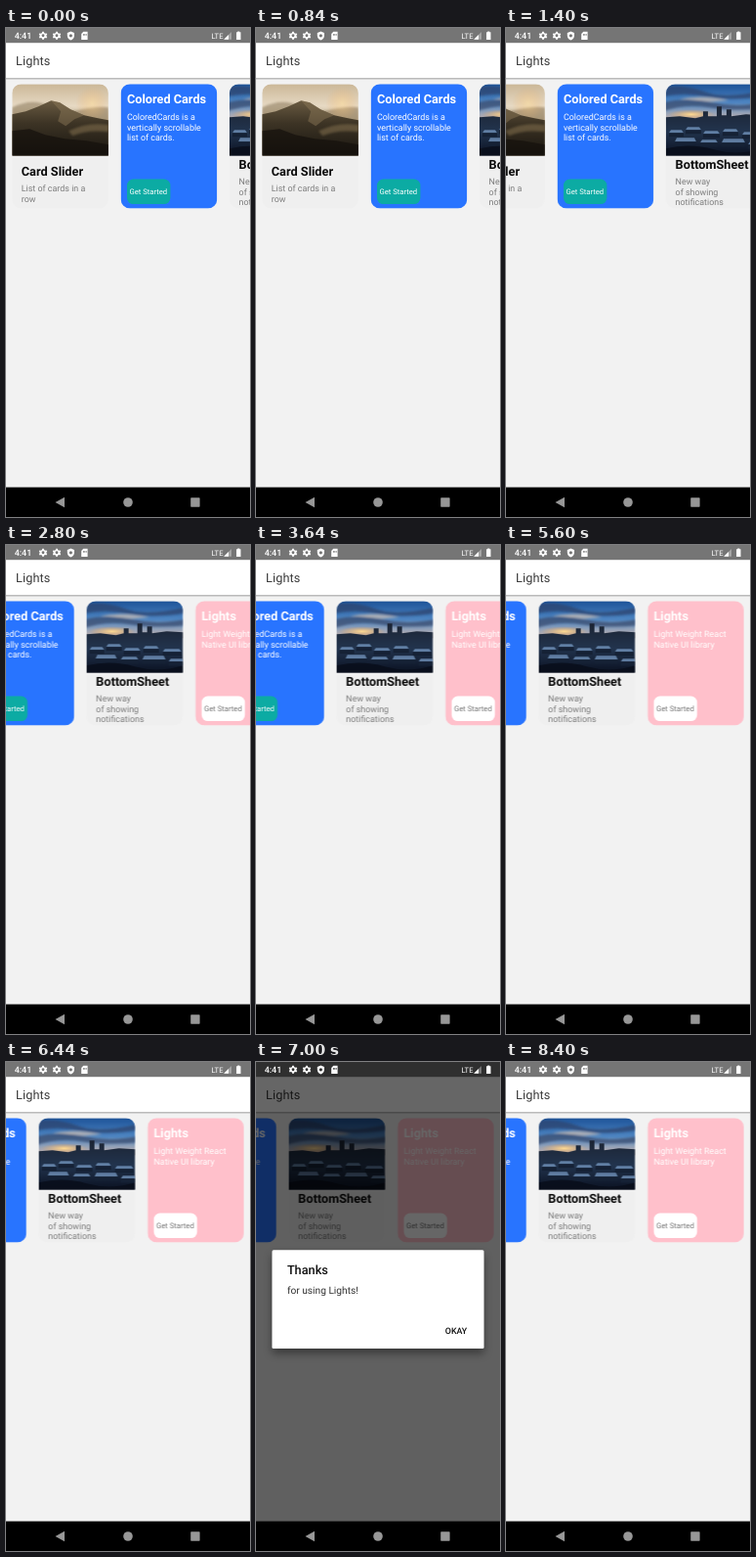
Write an HTML page that moves like this. It is 250 by 500 pixels and loops after 9.8 s.

```html
<!DOCTYPE html>
<html lang="en">
<head>
<meta charset="utf-8">
<title>Lights</title>
<style>
  html, body { margin: 0; width: 100%; height: 100%; overflow: hidden; background: #f2f2f2; }
  svg { display: block; width: 250px; height: 500px; }
  text { font-family: Roboto, sans-serif; font-size: 8.91px; text-rendering: geometricPrecision; }
  .title { font-size: 12.73px; font-weight: 700; }
  .button { font-size: 7.7px; }
  .grey { fill: #7d7d7d; }
  .white { fill: #fff; }
  .medium { font-weight: 500; }
</style>
</head>
<body>
<svg viewBox="0 0 250 500">
  <defs>
    <clipPath id="card"><rect width="98.7" height="127.3" rx="9.5"/></clipPath>
    <clipPath id="photo"><rect width="98.7" height="73.2"/></clipPath>
    <linearGradient id="shade" x2="0" y2="1">
      <stop stop-color="#000" stop-opacity=".3"/>
      <stop offset="1" stop-color="#000" stop-opacity="0"/>
    </linearGradient>
    <linearGradient id="haze" x2="0" y2="1">
      <stop stop-color="#cbb797"/><stop offset=".3" stop-color="#e6d9c3"/><stop offset=".6" stop-color="#b5a281"/>
    </linearGradient>
    <linearGradient id="hill" x2="0" y2="1">
      <stop stop-color="#6a5b42"/><stop offset=".4" stop-color="#3d3425"/><stop offset="1" stop-color="#17140f"/>
    </linearGradient>
    <linearGradient id="dusk" x2="0" y2="1">
      <stop stop-color="#1c5298"/><stop offset=".5" stop-color="#4f86c2"/>
      <stop offset=".85" stop-color="#a8a9b4"/><stop offset="1" stop-color="#b99a86"/>
    </linearGradient>
    <linearGradient id="town" x2="0" y2="1">
      <stop stop-color="#1c2433"/><stop offset=".5" stop-color="#22344e"/><stop offset="1" stop-color="#0a1020"/>
    </linearGradient>
    <radialGradient id="sun">
      <stop stop-color="#ffdc94"/><stop offset="1" stop-color="#f2a552" stop-opacity="0"/>
    </radialGradient>
    <filter id="soft" x="-20%" y="-20%" width="140%" height="140%"><feGaussianBlur stdDeviation="1.3"/></filter>
    <filter id="lift" x="-10%" y="-15%" width="120%" height="140%">
      <feDropShadow dx="0" dy="5" stdDeviation="4" flood-opacity=".4"/>
    </filter>
    <path id="gear" transform="scale(.9)" fill-rule="evenodd" d="M-1-4.4H1L1.3-3 2.4-2.4 3.7-2.9 4.7-1.2 3.7-.3V.4L4.7 1.3 3.7 3 2.4 2.5 1.3 3.1 1 4.4H-1L-1.3 3.1-2.4 2.5-3.7 3-4.7 1.3-3.7.4V-.3L-4.7-1.2-3.7-2.9-2.4-2.4-1.3-3ZM-1.6 0a1.6 1.6 0 1 0 3.2 0a1.6 1.6 0 1 0-3.2 0Z"/>
  </defs>

  <rect width="250" height="500" fill="#f2f2f2"/>
  <g id="strip"></g>

  <rect y="50.9" width="250" height="2.6" fill="url(#shade)"/>
  <rect y="15" width="250" height="35.9" fill="#fff"/>
  <text x="10" y="38" fill="#3a3a3a" style="font-size:12.73px;letter-spacing:.1px">Lights</text>
  <rect width="250" height="15.2" fill="#757575"/>
  <rect id="dim" width="250" height="470" fill="#000" fill-opacity=".6" opacity="0"/>

  <g class="white">
    <text class="medium" x="8.7" y="11.1" style="font-size:8.91px">4:41</text>
    <use href="#gear" x="38" y="7.8"/>
    <use href="#gear" x="52" y="7.8"/>
    <path fill-rule="evenodd" d="M66.4 3.4L70 5V7.8C70 10.1 68.5 11.8 66.4 12.4C64.3 11.8 62.8 10.1 62.8 7.8V5ZM64.8 7.8a1.6 1.6 0 1 0 3.2 0a1.6 1.6 0 1 0-3.2 0Z"/>
    <path fill-rule="evenodd" d="M79.3 3.8H83.6V11.9H77.2V6ZM79 5.9V7.7H79.8V5.9ZM80.4 5.9V7.7H81.2V5.9ZM81.8 5.9V7.7H82.6V5.9Z"/>
    <text x="210.5" y="10.6" style="font-size:7.64px">LTE</text>
    <path d="M223.2 11.8L231 4V11.8Z" opacity=".35"/>
    <path d="M223.2 11.8L228 7V11.8Z"/>
    <path d="M236.1 4.2H237.3V3.4H239.3V4.2H240.5V12H236.1Z"/>
  </g>

  <rect y="469.6" width="250" height="30.4"/>
  <g fill="#979797">
    <path d="M50.5 485L60 479.8V490.2Z"/>
    <circle cx="125" cy="485" r="4.8"/>
    <rect x="189.2" y="480.3" width="9.4" height="9.4" rx=".6"/>
  </g>

  <g id="dialog" opacity="0">
    <rect x="16.5" y="192.3" width="217" height="100.6" rx="1.5" fill="#fff" filter="url(#lift)"/>
    <text class="medium" x="31.9" y="217.4" fill="#111" style="font-size:12.73px">Thanks</text>
    <text x="31.9" y="237.1" fill="#333" style="font-size:10.19px">for using Lights!</text>
    <text class="medium" x="193.8" y="277.8" fill="#111">OKAY</text>
  </g>
</svg>
<script>
const LOOP = 9800;
const CARD_W = 98.7, PITCH = 111.4, LINE = 10.65;
const $ = id => document.getElementById(id);

const lines = (rows, x, y, cls) =>
  rows.map((row, i) => `<text class="${cls}" x="${x}" y="${y + i * LINE}">${row}</text>`).join('');

const colorCard = (fill, title, rows, btnFill, btnText) => `
  <rect width="${CARD_W}" height="127.3" fill="${fill}"/>
  <text class="title white" x="6.3" y="20">${title}</text>
  ${lines(rows, 6.3, 36.6, 'white')}
  <rect x="6.4" y="97.3" width="44.4" height="25.4" rx="6.4" fill="${btnFill}"/>
  <text class="button" x="8.9" y="112.7" fill="${btnText}">Get Started</text>`;

const photoCard = (photo, title, rows, y) => `
  <rect width="${CARD_W}" height="127.3" fill="#efefef"/>
  <g clip-path="url(#photo)">${photo}</g>
  <text class="title" x="9.6" y="${y}" fill="#0b0b0b">${title}</text>
  ${lines(rows, 9.6, y + 16.5, 'grey')}`;

const mountains = `
  <rect width="99" height="74" fill="url(#haze)"/>
  <path d="M0 24Q20 14 38 22T72 26T99 24V50H0Z" fill="#8f7d60" opacity=".6" filter="url(#soft)"/>
  <circle cx="82" cy="20" r="17" fill="url(#sun)" opacity=".5"/>
  <path d="M0 31L14 28 27 23 40 17 49 19 60 26 74 32 88 35 99 37V74H0Z" fill="url(#hill)"/>
  <path d="M40 17L49 19 60 26 74 32 64 36 55 43 47 38 50 28Z" fill="#8e7b59" opacity=".45"/>
  <path d="M58 48Q78 38 99 42V49Q78 46 62 53Z" fill="#8a7652" opacity=".5" filter="url(#soft)"/>
  <path d="M0 48L18 46 34 52 54 56 76 58 99 62V74H0Z" fill="#14110c" opacity=".7"/>`;

// Rooftops: [x, y, width, height]
const roofs = [[2, 47, 13, 3], [19, 44, 14, 3], [37, 48, 15, 3], [57, 46, 14, 3],
  [77, 49, 17, 3], [8, 55, 20, 4], [34, 57, 16, 3], [56, 56, 22, 4], [83, 59, 14, 3]];
const city = `
  <rect width="99" height="38" fill="url(#dusk)"/>
  <g filter="url(#soft)">
    <path d="M-4 3Q20 0 40 8T103 6V12Q68 18 43 13T-4 13Z" fill="#2b456f" opacity=".75"/>
    <path d="M-4 19Q22 13 48 19T103 18V25Q68 28 44 24T-4 28Z" fill="#3d4f73" opacity=".8"/>
    <path d="M14 15Q40 11 64 17L46 18Z" fill="#d8c3b4" opacity=".7"/>
  </g>
  <ellipse cx="26" cy="31" rx="24" ry="5" fill="url(#sun)"/>
  <path d="M0 34L14 33 30 35 38 33V28H43V33H52V23H57V32H62V26H67V33L82 31 99 32V74H0Z" fill="url(#town)"/>
  ${roofs.map(([x, y, w, h]) => `
    <path d="M${x + 3} ${y}h${w - 2}l2 ${h}h-${w + 2}z" fill="#7698c2" opacity=".75"/>
    <rect x="${x + 1}" y="${y + h}" width="${w + 2}" height="4" fill="#152135"/>`).join('')}
  <path d="M0 66Q25 60 49 67T99 66V74H0Z" fill="#080d1a" opacity=".8"/>`;

const cards = [
  photoCard(mountains, 'Card Slider', ['List of cards in a', 'row'], 93.4),
  colorCard('#2874ff', 'Colored Cards',
    ['ColoredCards is a', 'vertically scrollable', 'list of cards.'], '#0caba3', '#fff'),
  photoCard(city, 'BottomSheet', ['New way', 'of showing', 'notifications'], 86.4),
  colorCard('#ffc0cb', 'Lights', ['Light Weight React', 'Native UI library'], '#fff', '#777'),
];
$('strip').innerHTML = cards.map((card, i) =>
  `<g transform="translate(${6.2 + i * PITCH} 57.3)"><g clip-path="url(#card)">${card}</g></g>`).join('');

// Steps are [time, value]; each value holds until the next time.
function play(id, prop, steps) {
  const frames = [...steps, [LOOP, steps[steps.length - 1][1]]].map(([t, value]) =>
    ({ offset: t / LOOP, [prop]: value, easing: 'step-end' }));
  $(id).animate(frames, { duration: LOOP, iterations: Infinity }).startTime = 0;
}

const scroll = [[0, 0], [1400, 65.1], [2800, 146.4], [4200, 182], [5600, 195.4]];
play('strip', 'transform', scroll.map(([t, x]) => [t, `translateX(${-x}px)`]));

const shown = [[0, 0], [7000, 1], [8400, 0]];
play('dim', 'opacity', shown);
play('dialog', 'opacity', shown);
</script>
</body>
</html>
```
